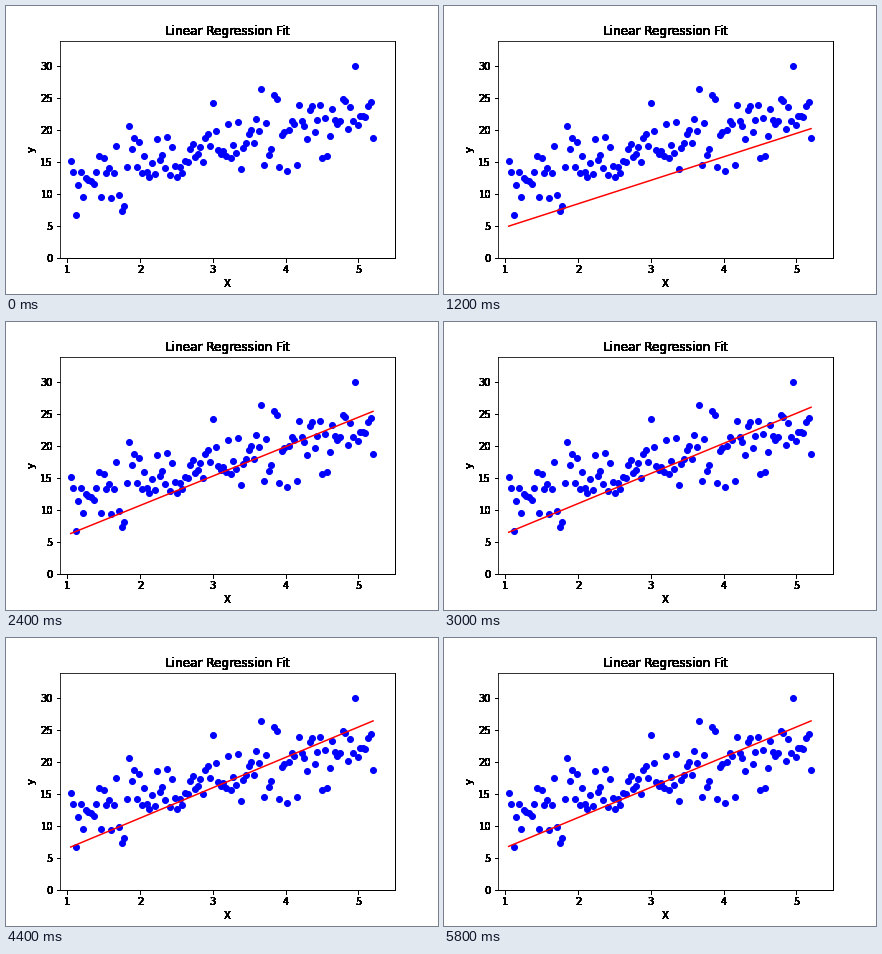
Recreate the animation shown at these times as a matplotlib script. Size 432 px wide and 288 px high, loop 6 s.

```python
import numpy as np
import matplotlib.pyplot as plt
from matplotlib.animation import FuncAnimation

FRAMES, INTERVAL = 30, 200
RATE = 0.0205       # learning rate of the descent
PASSES = 24         # redraws that turn soft edges solid

np.random.seed(10)
x = np.radians(np.arange(60, 300, 2))
y = 3 * x + 8 + np.random.normal(0, 3, len(x))

fig, ax = plt.subplots(figsize=(6, 4), dpi=72)
fig.subplots_adjust(left=0.125, right=0.9, bottom=0.125, top=0.88)
ax.set(xlim=(0.9, 5.5), ylim=(0, 34), xticks=range(1, 6),
       yticks=range(0, 31, 5), xlabel="X", ylabel="y",
       title="Linear Regression Fit")
ax.plot(x, y, "o", color="blue")
line, = ax.plot([], [], color="red", lw=1.5)


def harden(artist):
    """Draw an artist repeatedly so its antialiased edges become solid."""
    draw = artist.draw

    def draw_all(renderer):
        for _ in range(PASSES):
            draw(renderer)

    artist.draw = draw_all


for axis in (ax.xaxis, ax.yaxis):
    harden(axis.label)
    for tick in axis.get_major_ticks():
        harden(tick.label1)
        harden(tick.tick1line)
for part in (ax.title, ax.spines["right"], ax.spines["bottom"]):
    harden(part)


def descend(steps):
    slope = offset = 0.0
    for _ in range(steps):
        error = y - slope * x - offset
        slope += RATE * np.mean(error * x)
        offset += RATE * np.mean(error)
    return slope, offset


def update(k):
    if k == 0:
        line.set_data([], [])
    else:
        slope, offset = descend(k - 1)
        line.set_data(x, slope * x + offset)
    return line,


anim = FuncAnimation(fig, update, frames=FRAMES, interval=INTERVAL,
                     repeat=True, repeat_delay=0)
plt.show()
```
